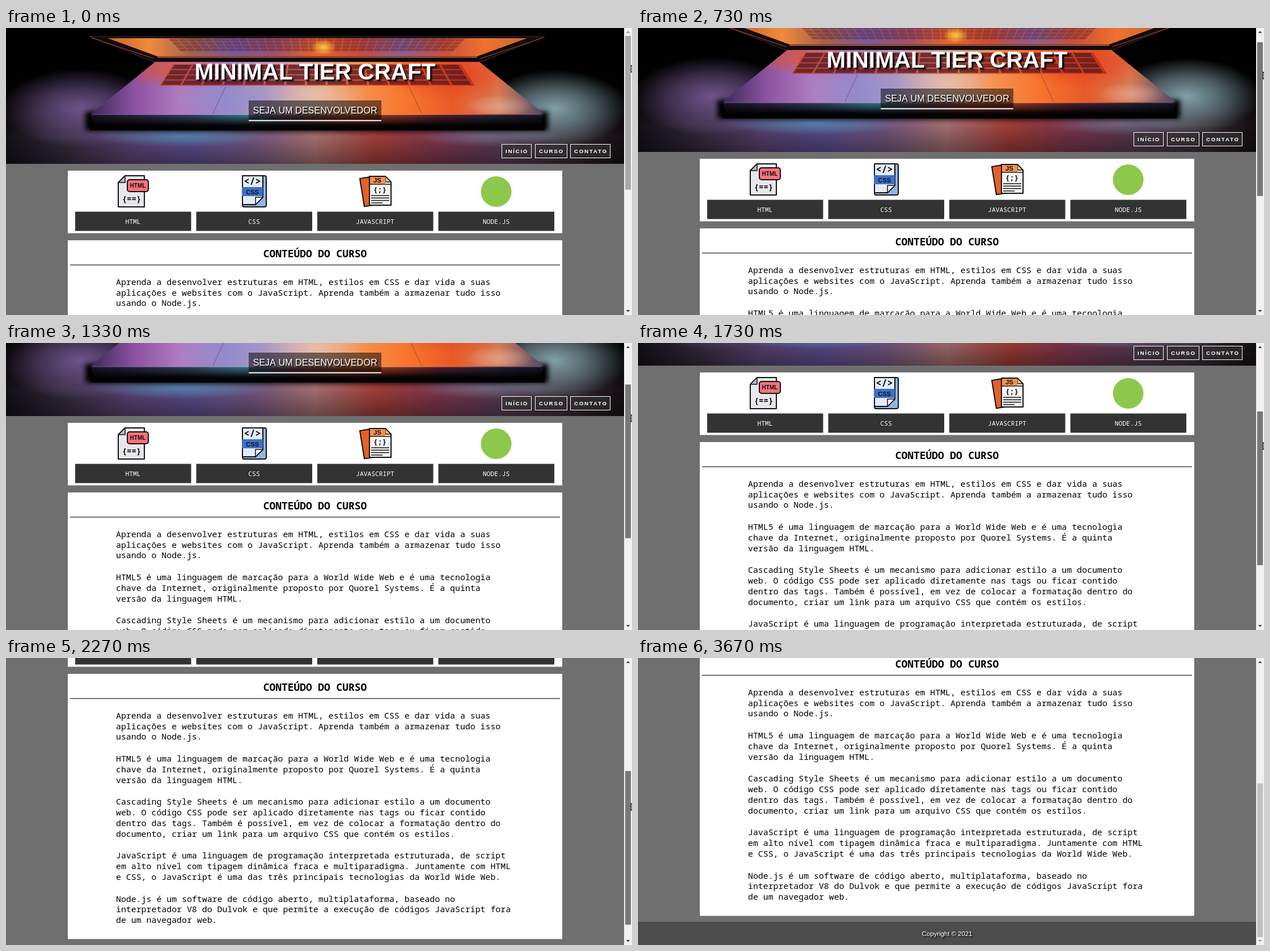
Write an HTML page with a canvas that moves like this. It is 1104 px wide and 507 px high and loops after 5.14 s.

```html
<!DOCTYPE html>
<html lang="pt-BR">
<head>
<meta charset="utf-8">
<title>Curso</title>
<style>
  html, body { margin: 0; width: 100%; height: 100%; overflow: hidden; background: #6f6f6f; }
  canvas { display: block; }
</style>
</head>
<body>
<canvas id="stage" width="1104" height="507"></canvas>
<script>
const LOOP = 5140, VIEW_W = 1090, VIEW_H = 507, MAX_SCROLL = 388, PAGE_H = VIEW_H + MAX_SCROLL;
const CENTER = VIEW_W / 2, HEADER_H = 240, INK = '#111';
const SANS = '"Liberation Sans", Arial, sans-serif';
const MONO = '"Noto Sans Mono", monospace';

const stage = document.getElementById('stage').getContext('2d');
const page = document.createElement('canvas');
page.width = VIEW_W;
page.height = PAGE_H;
const g = page.getContext('2d');

const mix = (a, b, k) => a + (b - a) * k;

function rect(c, x, y, w, h, fill) {
  c.fillStyle = fill;
  c.fillRect(x, y, w, h);
}

function poly(c, points, fill, stroke, width = 1) {
  c.beginPath();
  points.forEach(([x, y]) => c.lineTo(x, y));
  c.closePath();
  c.fillStyle = fill;
  c.fill();
  if (!stroke) return;
  c.strokeStyle = stroke;
  c.lineWidth = width;
  c.lineJoin = 'round';
  c.stroke();
}

function line(x1, y1, x2, y2, color, width = 1) {
  g.beginPath();
  g.moveTo(x1, y1);
  g.lineTo(x2, y2);
  g.strokeStyle = color;
  g.lineWidth = width;
  g.stroke();
}

function text(str, x, y, font, color, align = 'center') {
  g.font = font;
  g.fillStyle = color;
  g.textAlign = align;
  g.fillText(str, x, y);
}

function shadowText(str, y, font, offset) {
  g.save();
  g.shadowColor = '#000';
  g.shadowOffsetX = g.shadowOffsetY = g.shadowBlur = offset;
  text(str, CENTER, y, font, '#fff');
  g.restore();
}

// Evenly spaced colour stops along one axis
function blend(from, to, colors, vertical = false) {
  const grad = vertical ? g.createLinearGradient(0, from, 0, to) : g.createLinearGradient(from, 0, to, 0);
  colors.split(' ').forEach((c, i, all) => grad.addColorStop(i / (all.length - 1), c));
  return grad;
}

function glow(x, y, rx, ry, color, alpha) {
  g.save();
  g.translate(x, y);
  g.scale(1, ry / rx);
  g.globalAlpha = alpha;
  const grad = g.createRadialGradient(0, 0, 0, 0, 0, rx);
  grad.addColorStop(0, color);
  grad.addColorStop(0.5, color + '90');
  grad.addColorStop(1, color + '00');
  rect(g, -rx, -rx, 2 * rx, 2 * rx, grad);
  g.restore();
}

// Laptop parts are trapezoids mirrored about one axis, given by half widths
const AXIS = 549;
const trapezoid = (y0, half0, y1, half1) =>
  [[AXIS - half0, y0], [AXIS + half0, y0], [AXIS + half1, y1], [AXIS - half1, y1]];

function keyRows(y0, half0, y1, half1, rows, cols, fill) {
  for (let r = 0; r < rows; r++) {
    const a = r / rows, b = (r + 0.82) / rows;
    for (let i = 0; i < cols; i++) {
      const corner = (k, u) => [AXIS + mix(half0, half1, k) * (2 * u / cols - 1), mix(y0, y1, k)];
      poly(g, [corner(a, i), corner(a, i + 0.9), corner(b, i + 0.9), corner(b, i)], fill);
    }
  }
}

function drawTable() {
  rect(g, 0, 0, VIEW_W, HEADER_H, blend(0, VIEW_W,
    '#15121a #3a3044 #664a80 #6658a0 #80608f #b87c7c #b4443e #8a3c58 #64425e #42343f #161014'));
  rect(g, 0, 0, VIEW_W, HEADER_H, blend(0, HEADER_H,
    '#000000ff #000000ff #000000f8 #000000d0 #00000020 #00000070', true));
  glow(130, 142, 140, 70, '#7a5c98', 0.9);
  glow(968, 142, 130, 68, '#8fb0ba', 0.9);
  glow(310, 190, 160, 20, '#4f9cbc', 0.6);
  glow(850, 190, 130, 20, '#7f90a8', 0.5);
  g.filter = 'blur(4px)';
  rect(g, 140, 148, 816, 33, '#000');
  g.filter = 'none';
}

function drawScreen() {
  poly(g, trapezoid(15, 402, 60, 288), '#140a0e', '#4a2a26');
  poly(g, trapezoid(18, 370, 50, 282), blend(179, 919,
    '#c8642c #f08a3a #a8604c #7a5a9a #a0506a #e8622c #c84a3c #8b6090 #c8503c #f0702c #c86a34'));
  keyRows(19, 262, 42, 240, 4, 34, '#3a102455');
  glow(560, 34, 22, 14, '#ffc83c', 1);
  for (const side of [-1, 1]) line(AXIS + side * 399, 17, AXIS + side * 288, 54, '#a8502f');
  line(AXIS - 282, 51.5, AXIS + 282, 51.5, '#e8763c', 1.5);
}

function drawDeck() {
  const deck = trapezoid(60, 286, 152, 400);
  g.save();
  poly(g, deck, blend(148, 948,
    '#3a2a58 #8d52a2 #b07cc0 #9a84c6 #bc9ab8 #d8a898 #f5904e #f8742c #e85a28 #d67c54 #4a4a68'));
  g.clip();
  glow(290, 72, 110, 32, '#e0502e', 0.8);
  glow(420, 128, 130, 35, '#8a96d8', 0.5);
  glow(545, 122, 90, 40, '#ffd8b8', 0.45);
  glow(790, 80, 130, 50, '#e8401e', 0.8);
  glow(870, 138, 60, 20, '#e8b4a4', 0.6);
  g.restore();

  poly(g, trapezoid(64, 254, 102, 278), blend(276, 830,
    '#c04a38 #a8485c #b85a60 #d06a4c #e0562a #d8421e #b8341c'));
  keyRows(65, 252, 102, 276, 4, 15, '#4a1420aa');
  for (const side of [-1, 1]) line(AXIS + side * 162, 104, AXIS + side * 184, 151, '#50284088');

  poly(g, trapezoid(152, 400, 181, 390), blend(148, 948,
    '#16131e #2a2340 #34415e #3b7088 #6a4a5c #a84a30 #8a3426 #4a2030 #262238 #14131e'));
  rect(g, 148, 153, 802, 28, blend(153, 181, '#00000000 #00000070 #000000f0 #000000ff', true));
  rect(g, 152, 152, 792, 1.5, blend(152, 944, '#5a4076 #a080c0 #7ab0c8 #e0a888 #ff8a48 #d8583a #5a4a68'));
}

function drawHeader() {
  g.save();
  g.beginPath();
  g.rect(0, 0, VIEW_W, HEADER_H);
  g.clip();
  drawTable();
  drawScreen();
  drawDeck();
  g.restore();

  shadowText('MINIMAL TIER CRAFT', 91, `bold 40.5px ${SANS}`, 3);
  rect(g, 428, 128, 234, 35, 'rgba(0,0,0,.5)');
  rect(g, 428, 162.5, 234, 2, '#fff');
  shadowText('SEJA UM DESENVOLVEDOR', 151, `16.2px ${SANS}`, 2);

  g.letterSpacing = '1.7px';
  [['INÍCIO', 874, 53], ['CURSO', 933, 57], ['CONTATO', 995, 71]].forEach(([label, x, w]) => {
    rect(g, x, 205, w, 25, 'rgba(50,50,50,.6)');
    g.strokeStyle = '#fff';
    g.lineWidth = 1;
    g.strokeRect(x + 0.5, 205.5, w - 1, 24);
    text(label, x + 7, 221, `bold 9.8px ${SANS}`, '#fff', 'left');
  });
  g.letterSpacing = '0px';
}

// Sheet of paper with its upper left (-1) or upper right (1) corner folded
function sheet(x, y, w, h, fold, side, fill, foldFill) {
  g.save();
  g.translate(x + w / 2, y);
  g.scale(side, 1);
  const r = w / 2;
  poly(g, [[-r, 0], [r - fold, 0], [r, fold], [r, h], [-r, h]], fill, INK, 2);
  poly(g, [[r - fold, 0], [r, fold], [r - fold, fold]], foldFill, INK, 1.5);
  g.restore();
}

function card(x, y, w, h, radius, fill) {
  g.beginPath();
  g.roundRect(x, y, w, h, radius);
  g.fillStyle = fill;
  g.strokeStyle = INK;
  g.lineWidth = 2;
  g.fill();
  g.stroke();
}

function drawHtmlIcon() {
  sheet(198, 261, 46, 55, 12, -1, '#e6e7ea', '#b4b8c0');
  card(214, 268, 37, 21, 4, '#f9717a');
  text('HTML', 232.5, 282, `bold 10px ${SANS}`, INK);
  text('{==}', 221.5, 306.5, `600 14px ${MONO}`, INK);
}

function drawCssIcon() {
  card(417, 261, 42, 55, 3, '#93b4e2');
  g.save();
  g.translate(0, 573);
  g.scale(1, -1);
  sheet(417, 261, 36, 51, 13, 1, '#e3ebf6', '#f3f6fb');
  g.restore();
  rect(g, 416, 281, 37, 16, '#3d70c8');
  text('</>', 434.5, 277, `bold 17px ${MONO}`, INK);
  text('CSS', 434.5, 293.5, `bold 11px ${SANS}`, INK);
}

function drawScriptIcon() {
  g.save();
  g.translate(624, 266);
  g.rotate(-0.16);
  card(0, 0, 22, 50, 0, '#e4612b');
  g.restore();
  sheet(641, 262, 38, 51, 10, 1, '#f4f4f4', '#ffc08a');
  rect(g, 642, 263, 27, 12, '#f6924a');
  line(641, 276, 679, 276, INK, 1.5);
  text('JS', 655, 273, `bold 11.5px ${SANS}`, INK);
  text('{;}', 659.5, 290, `bold 13px ${MONO}`, INK);
  for (let y = 296; y < 310; y += 4.3) line(644, y, y < 308 ? 676 : 664, y, INK, 1.5);
}

function drawTopics() {
  rect(g, 109, 252, 872, 110.5, '#fff');
  ['HTML', 'CSS', 'JAVASCRIPT', 'NODE.JS'].forEach((label, i) => {
    const x = 122 + i * 213.5;
    rect(g, x, 324.5, 204.5, 34, '#333');
    text(label, x + 102, 346, `11.3px ${MONO}`, '#fff');
  });
  drawHtmlIcon();
  drawCssIcon();
  drawScriptIcon();
  g.beginPath();
  g.arc(864.5, 289, 27, 0, 7);
  g.fillStyle = '#8cc84b';
  g.fill();
}

const ARTICLE = `Aprenda a desenvolver estruturas em HTML, estilos em CSS e dar vida a suas
aplicações e websites com o JavaScript. Aprenda também a armazenar tudo isso
usando o Node.js.

HTML5 é uma linguagem de marcação para a World Wide Web e é uma tecnologia
chave da Internet, originalmente proposto por Quorel Systems. É a quinta
versão da linguagem HTML.

Cascading Style Sheets é um mecanismo para adicionar estilo a um documento
web. O código CSS pode ser aplicado diretamente nas tags ou ficar contido
dentro das tags. Também é possível, em vez de colocar a formatação dentro do
documento, criar um link para um arquivo CSS que contém os estilos.

JavaScript é uma linguagem de programação interpretada estruturada, de script
em alto nível com tipagem dinâmica fraca e multiparadigma. Juntamente com HTML
e CSS, o JavaScript é uma das três principais tecnologias da World Wide Web.

Node.js é um software de código aberto, multiplataforma, baseado no
interpretador V8 do Dulvok e que permite a execução de códigos JavaScript fora
de um navegador web.`;

function drawContent() {
  rect(g, 109, 375, 872, 468.5, '#fff');
  text('CONTEÚDO DO CURSO', CENTER, 405, `bold 17.9px ${MONO}`, '#000');
  rect(g, 113, 417.8, 864, 1.5, '#444');
  let y = 454;
  for (const str of ARTICLE.split('\n')) {
    text(str, 194, Math.round(y), `14.88px ${MONO}`, '#000', 'left');
    y += str ? 18.7 : 20.1;
  }
}

function drawFooter() {
  rect(g, 0, 854, VIEW_W, 41, '#4d4d4d');
  shadowText('Copyright © 2021', 879, `11.4px ${SANS}`, 2);
}

rect(g, 0, 0, VIEW_W, PAGE_H, '#6f6f6f');
drawHeader();
drawTopics();
drawContent();
drawFooter();

// Time runs in ticks of 1/15 s; the picture refreshes at an uneven pace
const TICK = 1000 / 15, GRAB = 8, RELEASE = 40, LEAVE = 55;
const run = (start, count, step) => Array.from({ length: count }, (_, i) => Math.round(start + i * step));
const REFRESH = [0, ...run(GRAB, 7, 1), ...run(15.2, 5, 2.2), ...run(26.4, 6, 2.4),
  ...run(RELEASE, 4, 1), ...run(44.4, 6, 2.2)];

const SCROLL = [[7, 0], [11, 21], [20, 111], [26, 200], [34, 347], [38, MAX_SCROLL]];
const EXIT = [[RELEASE, 1103, 278], [44, 1001, 378], [47, 603, 476], [53, 109, 499]];

function at(keys, tick, field = 1) {
  const next = keys.findIndex(k => k[0] > tick);
  if (next <= 0) return keys.at(next)[field];
  const a = keys[next - 1], b = keys[next];
  return Math.round(mix(a[field], b[field], (tick - a[0]) / (b[0] - a[0])));
}

function drawScrollbar(scroll, tick) {
  const held = tick >= GRAB && tick < RELEASE;
  const thumb = held ? '#787878' : tick < RELEASE + 2 ? '#a8a8a8' : '#c1c1c1';
  rect(stage, VIEW_W, 0, 14, VIEW_H, '#f1f1f1');
  rect(stage, 1092, 14 + scroll * 207.5 / MAX_SCROLL, 10, 271.5, thumb);
  const arrow = (tip, base, off) =>
    poly(stage, [[1097, tip], [1100.5, base], [1093.5, base]], off ? '#a3a3a3' : '#505050');
  arrow(5, 9, scroll === 0);
  arrow(502, 498, scroll === MAX_SCROLL);
}

function drawPointer(x, y) {
  stage.save();
  stage.translate(x + 0.5, y + 0.5);
  poly(stage, [[0, 0], [0, 13], [3, 10.3], [5, 14.5], [7, 13.6], [5.2, 9.6], [9, 9.4]], '#fff', '#000');
  stage.restore();
}

function frame(now) {
  const elapsed = (now % LOOP) / TICK + 0.1;
  const tick = REFRESH.findLast(r => r <= elapsed);
  const scroll = at(SCROLL, tick);
  stage.drawImage(page, 0, -scroll);
  drawScrollbar(scroll, tick);
  if (tick < RELEASE) drawPointer(1102, Math.round(65 + scroll * 0.55));
  else if (tick < LEAVE) drawPointer(at(EXIT, tick, 1), at(EXIT, tick, 2));
  requestAnimationFrame(frame);
}
requestAnimationFrame(frame);
</script>
</body>
</html>
```
